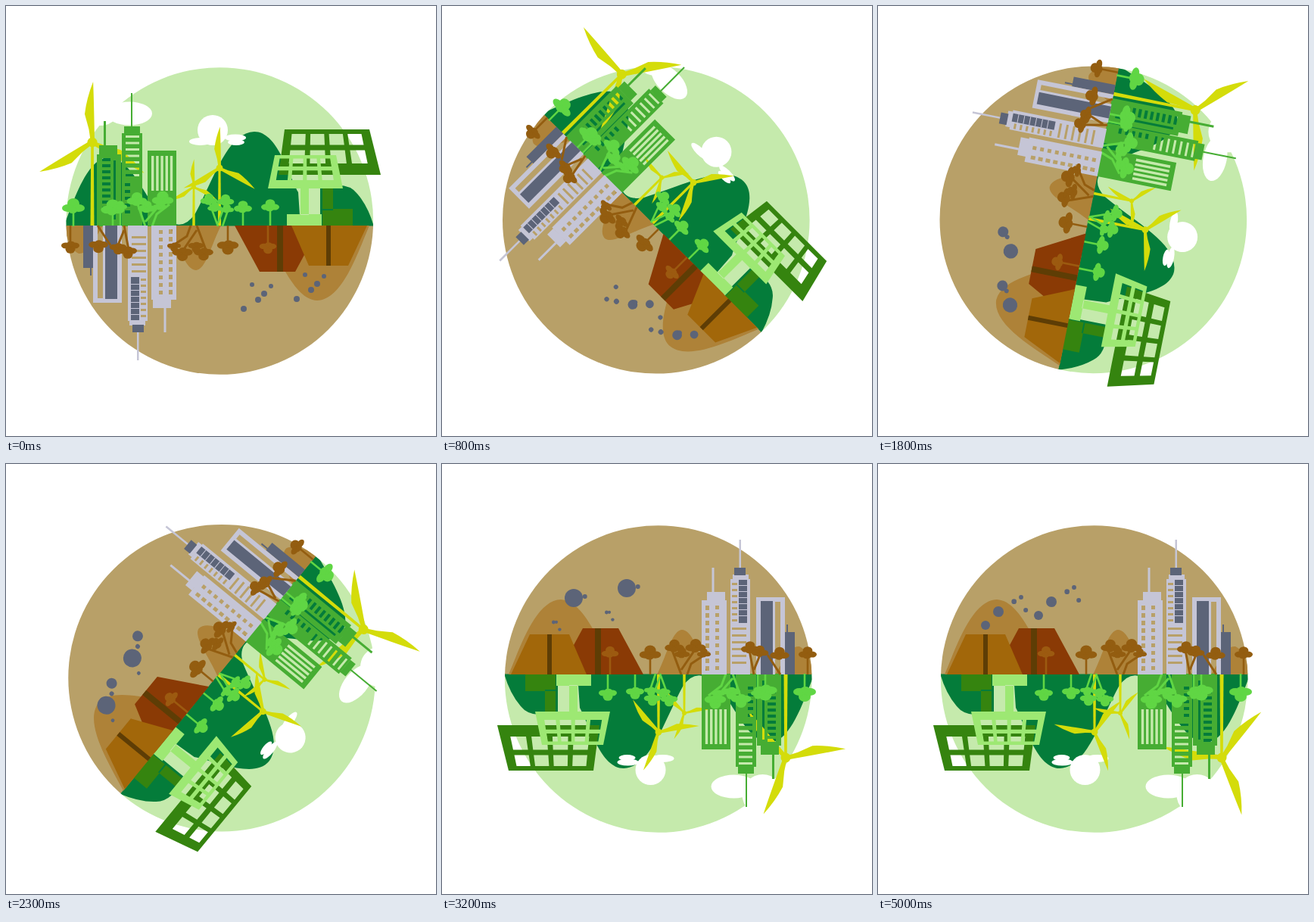
An HTML page that plays this animation: 568 by 568 pixels, repeating every 5.1 s.

```html
<!DOCTYPE html>
<html lang="en">
<head>
<meta charset="utf-8">
<title>Two-sided city</title>
<style>
html, body { margin: 0; width: 100%; height: 100%; overflow: hidden; background: #fff; }
svg { display: block; width: 100%; height: 100%; }
</style>
</head>
<body>
<svg id="stage" viewBox="0 0 568 568" xmlns="http://www.w3.org/2000/svg"></svg>
<script>
const LOOP = 5100, STEP = 100, TURN = 3200;
const C = {
  sky: '#c5eaac', hill: '#047c3a', city: '#46ad33', leaf: '#60d644', yellow: '#d4dc0a',
  panel: '#35840f', panelLight: '#9de873', earth: '#b8a068', mound: '#ae8238', dead: '#935d10',
  tower: '#c5c5d6', slate: '#5c6478', plantA: '#8a3a05', plantB: '#a2670a', shaft: '#5e3d05'
};

const path = (d, fill) => `<path d="${d}" fill="${fill}" fill-rule="evenodd"/>`;
const box = (x, y, w, h) => `M${x} ${y}h${w}v${h}h${-w}z`;
const poly = pts => 'M' + pts.map(p => p.map(v => v.toFixed(1)).join(' ')).join('L') + 'z';
const oval = (x, y, rx, ry, fill) => `<ellipse cx="${x}" cy="${y}" rx="${rx}" ry="${ry}" fill="${fill}"/>`;
const stroke = (d, color, w) => `<path d="${d}" fill="none" stroke="${color}" stroke-width="${w}"/>`;
const rows = (n, make) => Array.from({ length: n }, (_, i) => make(i)).join('');

const crown = (x, y, s, color) =>
  oval(x, y - 4 * s, 8 * s, 7 * s, color) +
  oval(x - 7 * s, y + 2 * s, 8 * s, 5 * s, color) +
  oval(x + 7 * s, y + 2 * s, 8 * s, 5 * s, color) +
  oval(x - s, y + 5 * s, 6 * s, 4 * s, color);
const tree = (x, y, s, color, base) =>
  stroke(`M${x} ${base}V${y}`, color, 2.6) + crown(x, y, s, color);

// Frame of a tilted solar panel: a quad with two rows of four openings
function panel(tl, tr, br, bl, fill) {
  const at = (u, v) => [0, 1].map(k =>
    (tl[k] * (1 - u) + tr[k] * u) * (1 - v) + (bl[k] * (1 - u) + br[k] * u) * v);
  let d = poly([tl, tr, br, bl]);
  for (const [v0, v1] of [[.1, .34], [.46, .75]])
    for (let i = 0; i < 4; i++) {
      const u0 = .09 + i * .215, u1 = u0 + .16;
      d += poly([at(u0, v0), at(u1, v0), at(u1, v1), at(u0, v1)]);
    }
  return path(d, fill);
}

const mills = [[114, 180, 1], [282, 214, .68], [248, 239, .46]];
function mill([x, y, s]) {
  const w = 1.2 + 1.3 * s;
  const blade = 'M-2 0L-5 -17L-11 -37Q-9 -58 -1 -80Q1 -50 3 0z';
  return path(poly([[x - w * .7, y], [x + w * .7, y], [x + w, 290], [x - w, 290]]), C.yellow) +
    `<g transform="translate(${x} ${y}) scale(${s})"><g class="rotor">` +
    [0, 120, 240].map(a => `<path d="${blade}" fill="${C.yellow}" transform="rotate(${a})"/>`).join('') +
    '</g>' + oval(0, 0, 6.5, 6.5, C.yellow) + '</g>';
}

function greenCity() {
  const a = box(120, 196, 32, 95) + box(123, 184, 24, 12) + box(129, 152, 3, 32) +
    rows(9, i => box(127, 201 + i * 8, 11, 4)) + box(142, 204, 3, 78);
  const b = box(153, 168, 27, 123) + box(156, 159, 21, 9) + box(165, 115, 2, 44) +
    rows(7, i => box(158, 171 + i * 8.5, 18, 3)) + rows(5, i => box(157, 234 + i * 9, 7, 4));
  const c = box(187, 191, 38, 100) + rows(5, i => box(192 + i * 6.2, 198, 3.4, 46));
  return path(a, C.city) + path(b, C.city) + path(c, C.city);
}

function greenTrees() {
  const g = C.leaf;
  return tree(89, 265, 1, g, 291) + tree(141, 267, 1.05, g, 291) + tree(151, 264, .6, g, 291) +
    stroke('M184 291L174 262M184 285L207 258M193 291L199 275L216 262', g, 3) +
    crown(173, 256, .9, g) + crown(207, 255, .95, g) + crown(186, 266, .8, g) + crown(203, 264, .6, g) +
    stroke('M280 291L268 258M280 287L291 258M286 291L293 270', g, 2.6) +
    crown(268, 256, .75, g) + crown(290, 257, .75, g) + crown(276, 266, .65, g) + crown(292, 268, .6, g) +
    tree(313, 266, .8, g, 291) + tree(349, 264, .8, g, 291);
}

function solar() {
  return path(box(418, 240, 14, 30) + box(418, 268, 40, 23), C.panel) +
    panel([368, 163], [480, 163], [495, 223], [360, 223], C.panel) +
    path(box(389, 240, 11, 36) + box(371, 275, 46, 16), C.panelLight) +
    panel([355, 197], [436, 197], [445, 241], [346, 241], C.panelLight);
}

function clouds() {
  const w = '#fff';
  return '<g id="clouds">' + oval(163, 142, 30, 15.5, w) + oval(125, 131, 27, 27, w) +
    oval(273, 164, 20, 20, w) + oval(257, 179, 15, 5, w) +
    oval(303, 174, 14, 4.5, w) + oval(304, 180, 11, 4, w) + '</g>';
}

// The grey half is laid out upright and turned by half a circle
function greyCity() {
  const a = box(343, 180, 33, 98) + box(350, 169, 24, 11) + box(356.5, 137, 3, 32) +
    rows(9, i => box(348, 187 + i * 10, 5, 6) + box(361, 187 + i * 10, 5, 5));
  const b = box(381, 152, 26, 126) + box(384, 146, 21, 6) + box(392.5, 100, 2.5, 38) +
    rows(7, i => box(383, 157 + i * 8, 7, 3)) + rows(6, i => box(383, 216 + i * 9, 19, 3));
  const c = box(415, 176, 38, 102) + box(440, 182, 7, 96);
  return path(box(453, 222, 13, 56) + box(455, 212, 2, 10), C.slate) +
    path(a, C.tower) + path(b, C.tower) + path(c, C.tower) +
    path(box(386, 137, 15, 10) + box(392, 153, 11, 57) + box(421, 181, 16, 97), C.slate) +
    path(rows(6, i => box(392, 160 + i * 8, 11, 1)), C.tower);
}

function greyTrees() {
  const g = C.dead;
  return tree(222, 249, .75, '#9c5a10', 278) + tree(275, 250, .95, g, 278) +
    stroke('M316 278L304 246M316 272L335 244M324 278L329 264L347 252', g, 3) +
    crown(307, 241, .85, g) + crown(335, 241, .9, g) + crown(346, 250, .6, g) + crown(317, 250, .7, g) +
    stroke('M412 278L406 246M412 272L421 250M447 278L430 252', g, 3) +
    crown(407, 243, .8, g) + crown(420, 248, .75, g) + crown(446, 251, .85, g) +
    tree(483, 250, .8, g, 278);
}

function plants() {
  return path('M153 278L186 217H233L266 278z', C.plantA) + path(box(202, 217, 8, 61), C.shaft) +
    path('M91 278L116 225H168L191 278z', C.plantB) + path(box(139, 225, 6, 53), C.shaft);
}

const mounds = 'M88 278C104 240 124 180 157 179C190 181 206 240 236 278z' +
  'M284 278C298 250 304 220 317 219C332 220 338 250 352 278z' +
  'M440 278C452 258 460 240 472 241C482 245 488 262 492 278z';
const hills = 'M76 291C88 262 106 202 134 200C170 200 186 268 218 286Q236 295 250 274' +
  'C276 226 292 168 328 166C358 166 372 220 386 246L389 291z' +
  'M415 291V241Q450 230 464 248Q478 264 486 291z';

// Smoke of the right plant as [seconds, x, y, radius]; the left plume repeats it
const bigPuffs = [
  [[0, 218, 198, 3], [1, 212, 200, 6], [2.3, 231, 176, 12], [3.2, 244, 164, 12], [4, 262, 160, 3]],
  [[0, 227, 188, 4], [1, 229, 182, 7], [2.3, 258, 163, 7], [3, 264, 158, 0]]
];
const smallPuffs = [
  [[0, 235, 180, 4], [1.5, 257, 163, 3]],
  [[0, 254, 168, 4], [1.4, 261, 161, 2.5]],
  [[0, 243, 200, 3], [1.4, 274, 172, 3]],
  [[.2, 221, 194, 3], [3.3, 260, 161, 3]],
  [[2.1, 221, 195, 2.5], [3.4, 221, 196, 2]],
  [[3, 221, 207, 2], [4, 243, 200, 3]],
  [[3, 215, 198, 2], [4, 227, 188, 4]]
];
const puffs = bigPuffs.concat(smallPuffs);

function puffAt(keys, s) {
  const i = keys.findIndex(k => k[0] > s);
  if (i < 1) return [0, 0, 0];
  const a = keys[i - 1], b = keys[i];
  const k = (s - a[0]) / (b[0] - a[0]);
  return a.map((v, j) => v + (b[j] - v) * k).slice(1);
}

const dots = puffs.map(() => '<circle/>').join('');
const stage = document.getElementById('stage');
stage.innerHTML =
  '<defs><clipPath id="disc"><circle cx="282.3" cy="284" r="202.8"/></clipPath></defs>' +
  '<g id="world">' +
    '<g clip-path="url(#disc)">' + path(box(70, 70, 430, 222), C.sky) + path(hills, C.hill) +
      path(box(70, 290.5, 430, 210), C.earth) +
      `<g transform="rotate(180 284 284)">${path(mounds, C.mound)}</g></g>` +
    clouds() + mills.map(mill).join('') + greenCity() + solar() + greenTrees() +
    '<g transform="rotate(180 284 284)">' + greyCity() + plants() + greyTrees() +
      `<g class="smoke" fill="${C.slate}">${dots}</g>` +
      `<g class="smoke" fill="${C.slate}" transform="translate(-70 13)">${dots}</g></g>` +
  '</g>';

const world = document.getElementById('world');
const sky = document.getElementById('clouds');
const rotors = stage.querySelectorAll('.rotor');
const plumes = stage.querySelectorAll('.smoke');

function draw(ms) {
  const s = ms / 1000;
  world.setAttribute('transform', `rotate(${180 * Math.min(1, ms / TURN)} 284 284)`);
  rotors.forEach(r => r.setAttribute('transform', `rotate(${1.5 + 44 * s})`));
  sky.setAttribute('transform', `translate(${11.5 - 11.5 * Math.cos(Math.PI * s / 4.3)} 0)`);
  puffs.forEach((keys, i) => {
    const [x, y, r] = puffAt(keys, s % 4);
    plumes.forEach(p => {
      const c = p.children[i];
      c.setAttribute('cx', x);
      c.setAttribute('cy', y);
      c.setAttribute('r', r);
    });
  });
}

const start = performance.now();
function tick() {
  const t = (performance.now() - start) % LOOP;
  draw(Math.floor(t / STEP) * STEP);
  requestAnimationFrame(tick);
}
tick();
</script>
</body>
</html>
```
